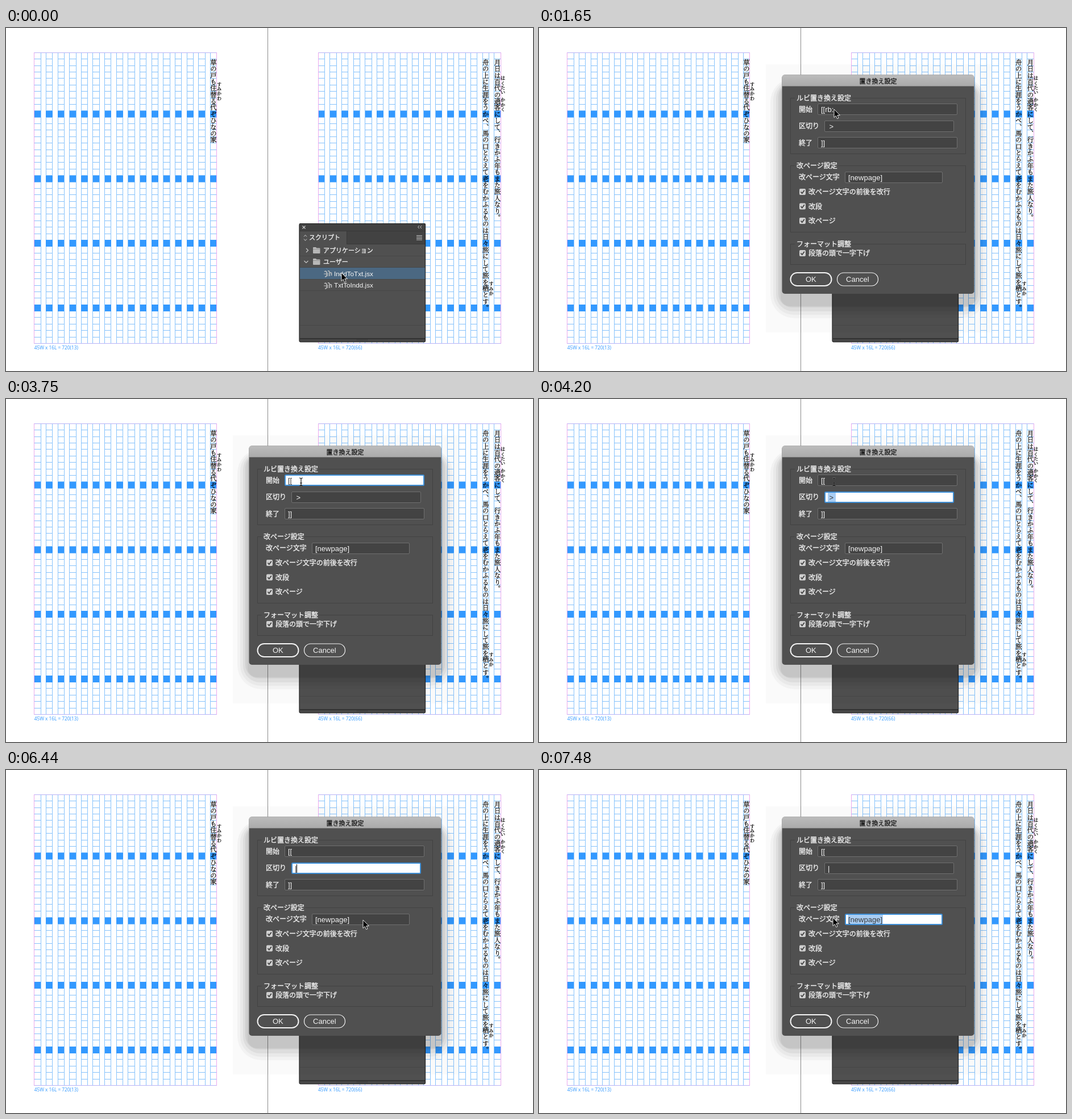
Write an HTML page that moves like this. It is 927x604 px and loops after 8 s.

```html
<!DOCTYPE html>
<html lang="ja">
<head>
<meta charset="utf-8">
<title>置き換え設定</title>
<style>
  html, body { margin: 0; width: 100%; height: 100%; overflow: hidden; background: #fff; }
  svg { display: block; width: 100%; height: 100%; }
  text { white-space: pre; }
  .ui { font: 500 12px "Noto Sans CJK JP", "Noto Sans CJK", sans-serif; fill: #f4f4f4; stroke: #f4f4f4; stroke-width: .3; }
  .small { font-size: 11px; }
  .title { fill: #1c1c1c; stroke: #1c1c1c; }
  .latin { font: 13px "Liberation Sans", Arial, sans-serif; fill: #f4f4f4; }
  .file { font-size: 11.7px; }
  .note { font: 8.3px "Open Sans", sans-serif; fill: #3399ff; }
  .tate { font-family: "Noto Serif CJK JP", "Noto Sans CJK JP", "Noto Sans CJK", serif; writing-mode: vertical-rl; fill: #000; stroke: #000; stroke-width: .25; }
  .crisp { shape-rendering: crispEdges; }
</style>
</head>
<body>
<svg viewBox="0 0 927 604">
  <g id="pages"></g>
  <g id="panel"></g>
  <g id="dialog"></g>
  <g id="live"></g>
</svg>
<script>
const CELL = 11.38, PITCH = 20.65, TOP = 43.4, ROWS = 45, COLS = 16;
const byId = id => document.getElementById(id);
const range = (n, fn) => Array.from({ length: n }, (_, i) => fn(i)).join('');
const rect = (x, y, w, h, fill, more = '') =>
  `<rect x="${x}" y="${y}" width="${w}" height="${h}" fill="${fill}" ${more}/>`;
const line = (d, color, width = 1, more = '') =>
  `<path d="${d}" fill="none" stroke="${color}" stroke-width="${width}" ${more}/>`;
const text = (x, y, str, cls = 'ui', more = '') =>
  `<text x="${x}" y="${y}" class="${cls}" ${more}>${str.replace(/</g, '&lt;').replace(/>/g, '&gt;')}</text>`;

// Manuscript pages
function page(left, note) {
  const height = ROWS * CELL, right = left + (COLS - 1) * PITCH + CELL;
  const cols = range(COLS, c => {
    const x = left + c * PITCH;
    const rules = range(ROWS + 1, r => `M${x} ${TOP + r * CELL}h${CELL}`);
    return line(`${rules}M${x} ${TOP}v${height}M${x + CELL} ${TOP}v${height}`, '#86c2fb', 1, 'class="crisp"') +
      range(4, k => rect(x, TOP + (10 * k + 9) * CELL, CELL, CELL, '#3399ff', 'class="crisp"'));
  });
  return cols +
    line(`M${left} ${TOP}H${right}M${left} ${TOP + height}H${right}`, '#b9b4f6', 1, 'class="crisp"') +
    line(`M${left} ${TOP}v${height}M${right} ${TOP}v${height}`, '#eba9ee', 1, 'class="crisp"') +
    text(left, 566, note, 'note');
}
const column = (x, str) => text(x, TOP + CELL, str, 'tate', `font-size="${CELL}"`);
const ruby = (x, y, str) => text(x, y, str, 'tate', 'font-size="8.2"');

byId('pages').innerHTML =
  line('M460.5 0V604', '#8c8c8c') +
  page(49.7, '45W x 16L = 720(13)') +
  page(549.1, '45W x 16L = 720(66)') +
  column(365, '草の戸も住替る代ぞひなの家') +
  column(864.5, '月日は百代の過客にして、行きかふ年もまた旅人なり。') +
  column(843.8, '舟の上に生涯をうかべ、馬の口とらえて老をむかふるものは日々旅にして旅を栖とす。') +
  ruby(375, 94.8, 'すみかわ') + ruby(874, 84.2, 'はくたい') +
  ruby(874, 122.2, 'かかく') + ruby(853.5, 446.2, 'すみか');

// Scripts panel
const folder = y => `<path d="M540 ${y - 4}q0-1 1-1h4l1.5 1.5h5q1 0 1 1V${y + 5}q0 1-1 1h-10.5q-1 0-1-1z" fill="#b8b8b8"/>` +
  line(`M540 ${y - 1.5}h12.5`, '#8a8a8a', .8);
const script = y => line(`M560 ${y - 3}q3-2 4 1v6q0 2-3 2M566 ${y - 4}q3-1 3 2v7M570 ${y - 1}q2-1 2.5 1v4`, '#c2c2c2', 1.5) +
  line(`M559 ${y + 1}h4M566 ${y - 1}v6`, '#c2c2c2');

byId('panel').innerHTML =
  rect(516, 344, 222, 209, '#505050', 'rx="2"') +
  rect(516, 344, 222, 37, '#424242', 'rx="2"') +
  rect(517, 357, 82, 24, '#505050') +
  line('M599.5 357V380.5H737M517 357.5H737', '#383838') +
  line('M521.5 348.5l5 5m0-5l-5 5', '#d0d0d0', 1.1) +
  line('M727 348l-2.5 2.5 2.5 2.5M731 348l-2.5 2.5 2.5 2.5', '#d0d0d0') +
  line('M524 367.5l2.5-3 2.5 3M524 371.5l2.5 3 2.5-3', '#c8c8c8') +
  line('M722 365.5h10m-10 2.5h10m-10 2.5h10m-10 2.5h10', '#c0c0c0') +
  rect(517, 422, 220, 20, '#4b6882') +
  line('M517 401.5H737M517 421.5H737M517 442.5H737M517 462.5H737M517 523.5H737', '#474747') +
  line('M528 388l3.5 3.5-3.5 3.5M524.5 410l3.5 3.5 3.5-3.5', '#c8c8c8', 1.2) +
  folder(391) + folder(411) + script(432) + script(453) +
  text(533, 373, 'スクリプト', 'ui small') +
  text(558, 395.5, 'アプリケーション', 'ui small') +
  text(558, 415.5, 'ユーザー', 'ui small') +
  text(577, 436.5, 'InddToTxt.jsx', 'latin file') +
  text(577, 457, 'TxtToIndd.jsx', 'latin file') +
  rect(517, 546, 220, 2, '#333') + rect(517, 548, 220, 5, '#474747') +
  line('M617 548.5h19m-19 2h19', '#343434', 1, 'stroke-dasharray="1 1"') +
  rect(515.9, 344.5, 221.7, 208.4, 'none', 'rx="2" stroke="#1c1c1c"');

// Settings dialog
const shadow = (spread, top, bottom, r, alpha) =>
  rect(427 - spread, top, 339 + 2 * spread, bottom - top, '#000', `rx="${r}" opacity="${alpha}"`);
const group = (y, h, label) =>
  rect(442.5, y + .5, 308, h, 'none', 'stroke="#424242"') +
  rect(450, y - 2, 12 * label.length + 4, 5, '#505050') + text(453, y + 5.1, label);
const check = (y, label) =>
  rect(458, y - 5.5, 11, 11, '#cfcfcf', 'rx="2"') +
  line(`M460.5 ${y}l2.3 2.7 4-5.5`, '#3c3c3c', 1.7) + text(474, y + 4.6, label);

byId('dialog').innerHTML =
  rect(399, 64, 398, 472, '#000', 'opacity=".018"') +
  shadow(20, 88, 511, 42, .03) + shadow(15, 91, 505, 36, .04) +
  shadow(10, 94, 499, 30, .05) + shadow(6, 97, 492, 24, .06) + shadow(2, 100, 490, 16, .05) +
  '<linearGradient id="bar" x2="0" y2="1"><stop stop-color="#bcbcbc"/><stop offset="1" stop-color="#aaa"/></linearGradient>' +
  rect(427.5, 82.5, 338, 385.5, '#505050', 'rx="5"') +
  '<path d="M427.5 102.5V87.5q0-5 5-5H760.5q5 0 5 5V102.5z" fill="url(#bar)"/>' +
  text(596.5, 97.5, '置き換え設定', 'ui small title', 'text-anchor="middle"') +
  group(123, 98, 'ルビ置き換え設定') + group(242, 117, '改ページ設定') + group(380, 36, 'フォーマット調整') +
  text(457, 147.9, '開始') + text(457, 177.2, '区切り') + text(457, 206.7, '終了') + text(457, 267.2, '改ページ文字') +
  check(288.5, '改ページ文字の前後を改行') + check(314, '改段') + check(339.5, '改ページ') + check(396.5, '段落の頭で一字下げ');

// Parts that change
function field(x, y, w, h, { str, tx = x + 6, focus, sel, caret }) {
  const box = focus
    ? rect(x + 1, y + 1, w - 2, h - 2, '#fff', 'rx="1.5" stroke="#3f8fd6" stroke-width="2"')
    : rect(x + .5, y + .5, w - 1, h - 1, '#434343', 'rx="1.5" stroke="#6f6f6f"');
  return box +
    (sel ? rect(sel[0], y + 2, sel[1] - sel[0], h - 4, '#a9cdf3') : '') +
    text(tx, y + h / 2 + 5, str, 'latin', focus ? 'style="fill:#3a3a3a"' : '') +
    (caret ? rect(caret - .5, y + 3, 1, 15, '#000') : '');
}
function button(x, label, width, hover) {
  return rect(x + .5, 431, 72, 23, hover ? '#f7f7f7' : 'none', `rx="11.5" stroke="#f4f4f4" stroke-width="${width}"`) +
    text(x + 36.3, 447, label, 'latin', `text-anchor="middle"${hover ? ' style="fill:#555"' : ''}`);
}
const arrow = (x, y) => `<path transform="translate(${x} ${y})" d="M0 0V14.5L3.3 11.5 5.6 16.7 8 15.6 5.8 10.6H10.3Z" fill="#000" stroke="#fff" stroke-width=".9"/>`;
function beam(x, y) {
  const d = `M${x - 3} ${y - 7}q3 0 3 2V${y + 5}q0 2-3 2M${x + 3} ${y - 7}q-3 0-3 2m0 10q0 2 3 2M${x - 2} ${y + 2}h4`;
  return line(d, '#ffffff66', 2) + line(d, '#111', 1.2);
}

const PAGE = '[newpage]';
const steps = [
  [0, { cursor: [590, 431], start: { str: '[[rb:' }, split: { str: '>', tx: 510.5 }, mark: { str: PAGE } }],
  [600, { open: true, hover: true }],
  [1200, { hover: false, cursor: [552, 380] }],
  [1350, { cursor: [478, 255] }],
  [1500, { cursor: [492, 170] }],
  [1650, { cursor: [519, 143] }],
  [1800, { cursor: [519, 146], ibeam: true }],
  [1950, { start: { str: '[[rb:', focus: true, caret: 519 } }],
  [2550, { start: { str: '[[rb', focus: true, caret: 515.5 } }],
  [2850, { start: { str: '[[r', focus: true, caret: 508.5 } }],
  [3150, { start: { str: '[[', focus: true, caret: 503.5 } }],
  [3750, { start: { str: '[[', focus: true } }],
  [4050, { start: { str: '[[' }, split: { str: '>', tx: 510.5, focus: true, sel: [508, 522] } }],
  [5250, { split: { str: '|', focus: true, caret: 511.5 } }],
  [5850, { cursor: [524, 152] }],
  [6000, { cursor: [548, 185], ibeam: false }],
  [6150, { cursor: [585, 225] }],
  [6300, { cursor: [614, 254] }],
  [6440, { cursor: [628, 264] }],
  [6590, { cursor: [631, 264] }],
  [6740, { cursor: [632, 263] }],
  [6890, { split: { str: '|' }, mark: { str: PAGE, focus: true, caret: 604.5 } }],
  [7040, { cursor: [612, 262] }],
  [7190, { cursor: [575, 262], mark: { str: PAGE, focus: true, sel: [575, 605] } }],
  [7340, { cursor: [536, 261], mark: { str: PAGE, focus: true, sel: [543.5, 605] } }],
  [7480, { cursor: [517, 260] }],
];

function draw(s) {
  byId('dialog').style.display = s.open ? '' : 'none';
  const controls = s.open
    ? field(490, 133, 246, 20, s.start) +
      field(502, 163, 228, 20, { tx: 508, ...s.split }) +
      field(490, 192, 246, 20, { str: ']]' }) +
      field(538, 253, 172, 20, s.mark) +
      button(442, 'OK', 2, false) + button(524, 'Cancel', 1.2, s.hover)
    : '';
  byId('live').innerHTML = controls + (s.ibeam ? beam : arrow)(...s.cursor);
}

let shown = 0;
function tick() {
  const t = performance.now() % 8000;
  const count = steps.filter(([at]) => at <= t).length;
  if (count !== shown) {
    shown = count;
    draw(Object.assign({}, ...steps.slice(0, count).map(step => step[1])));
  }
  requestAnimationFrame(tick);
}
tick();
</script>
</body>
</html>
```
